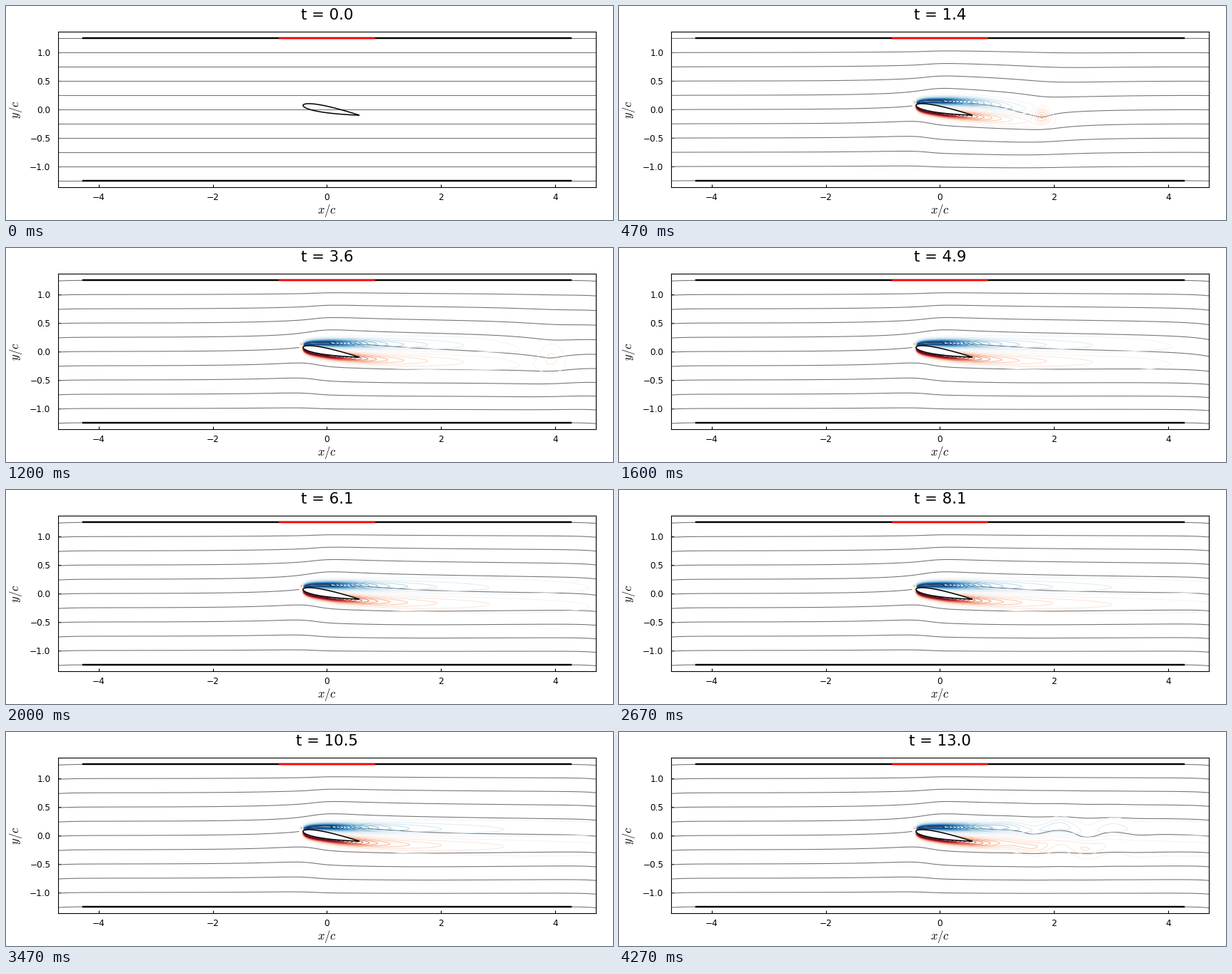
A matplotlib script that plays this animation: 850 by 300 pixels, repeating every 4.34 s.

```python
import numpy as np
import matplotlib.pyplot as plt
from matplotlib.animation import FuncAnimation

W, H, DPI = 850, 300, 100
TICKS, TICK_MS = 124, 35                       # 4340 ms per loop
STEP_MS, LEAD_MS, DT = 200 / 3, 25, 0.2026     # flow state advances 15 times a second
X0, Y0, SCALE = 449.4, 145.1, 79.85            # pixel origin, pixels per chord
LEFT, RIGHT, TOP, BOTTOM = 73, 826, 36, 254.3
WALL, GAP = 4.28, 2.5                          # wall half length, channel height
GAMMA, NU = 0.28, 0.0033
ALPHA = np.radians(10)

plt.rcParams.update({"font.family": "DejaVu Sans", "mathtext.fontset": "cm"})


def step(u):
    return 0.5 * (1 + np.tanh(u / 2))


def bell(u):
    return np.exp(-0.5 * u * u)


def airfoil():
    """NACA 0012 outline, pitched about its centroid."""
    s = 0.5 * (1 - np.cos(np.linspace(0, np.pi, 60)))
    half = 0.6 * (0.2969 * np.sqrt(s) - 0.126 * s - 0.3516 * s**2
                  + 0.2843 * s**3 - 0.1036 * s**4)
    px = np.r_[s[::-1], s[1:]] - 0.425
    py = np.r_[half[::-1], -half[1:]]
    c, n = np.cos(ALPHA), np.sin(ALPHA)
    return c * px + n * py, c * py - n * px


def front(t):
    """Position of the starting vortex."""
    return 0.43 + 0.96 * t


def wave(x, t):
    """Late wake instability: a growing, drifting wave packet."""
    late = t - 12.97
    env = np.exp(late / 0.8) * np.exp(-((x - 2.35 - 0.85 * late) / 1.0) ** 2)
    return env * np.cos(2 * np.pi * (x - 2.1 - 0.85 * late))


def channel_vortex(x, y, xv, yv, core):
    """Stream function of a unit vortex between the two walls."""
    k = np.pi / GAP
    soft = 0.5 * (k * core) ** 2
    c = np.cosh(k * (x - xv)) + soft
    return np.log((c - np.cos(k * (y - yv))) / (c + np.cos(k * (y + yv)))) / (4 * np.pi)


def stream(x, y, t):
    if t == 0:
        return y
    g = GAMMA * (1 - 0.5 * np.exp(-t / 0.5))
    xv = front(t)
    psi = y - g * channel_vortex(x, y, xv, -0.1, np.sqrt(2 * NU * t))
    for xb, yb, part in ((-0.3, 0.1, 0.55), (-0.05, 0.07, 0.35), (0.25, 0, 0.15)):
        psi = psi + g * part * channel_vortex(x, y, xb, yb, 0.13)

    # blockage of body and wake
    after = np.maximum(x, 0)
    mid = np.interp(x, [-0.6, 0.57, 1.5], [0.1, -0.08, -0.04])
    block = 0.114 * step((x + 0.2) / 0.13) / (1 + 0.05 * after**2) * step((xv - x) / 0.3)
    psi = psi - block * np.tanh((y - mid) / (0.13 + 0.02 * after)) * (1 - np.abs(y) / 1.25)

    # sag beyond the wall ends
    sag = np.where(x > 0, 0.02, 0.014) * (1 - np.exp(-(t / 3) ** 2))
    psi = psi + sag * np.exp(np.minimum(np.abs(x) - 4.71, 0) / 0.2)
    psi = psi - 0.045 * wave(x, t) * np.exp(-np.abs(y) / 0.22)

    chord = -np.tan(ALPHA) * x
    body = (np.abs(x - 0.02) < 0.5) & (np.abs(y - chord - 0.03) < 0.17)
    return np.ma.masked_where(body, psi)


def vorticity(x, y, t):
    xv, var = front(t), 2 * NU * t
    spot = np.exp(-((x - xv) ** 2 + (y + 0.1) ** 2) / (2 * var))
    start = GAMMA / (2 * np.pi * var) * spot

    xc = np.maximum(x, -0.46)
    dip = -0.13 * np.exp(-((x - xv) / 0.8) ** 2)
    wob = wave(x, t)
    upper = 0.15 - 0.018 * xc - 0.08 * np.exp(-(xc + 0.45) / 0.09) + dip + 0.055 * wob
    lower = (-0.19 + 0.13 * np.exp(-xc) + 0.09 * np.exp(-(xc + 0.45) / 0.06)
             + dip * 0.3 + 0.055 * wob)
    width = (0.045 + 0.022 * xc) * (1 - 0.6 * np.exp(-t / 0.4))
    amp = 5.3 / (np.hypot(np.maximum(x, 0), 0.4) - 0.05)
    amp = amp * step((0.43 + 0.7 * t - x) / (0.1 + 0.18 * t)) * step((x + 0.43) / 0.012)
    pulse = 0.35 * np.clip(wob, -1, 1)
    red = amp * (1 - pulse) * bell((y - lower) / width)
    blue = amp * (1 + pulse) * bell((y - upper) / width)
    nose = 4 * bell(np.hypot(x + 0.445, y - 0.13) / 0.012)
    return start + red - blue + nose


fig = plt.figure(figsize=(W / DPI, H / DPI), dpi=DPI, facecolor="white")
ax = fig.add_axes([LEFT / W, 1 - BOTTOM / H, (RIGHT - LEFT) / W, (BOTTOM - TOP) / H])
ax.set_xlim((LEFT - X0) / SCALE, (RIGHT - X0) / SCALE)
ax.set_ylim((Y0 - BOTTOM) / SCALE, (Y0 - TOP) / SCALE)
ax.set_xticks([-4, -2, 0, 2, 4])
ax.set_yticks([-1.0, -0.5, 0.0, 0.5, 1.0])
ax.tick_params(direction="in", length=3.2, width=0.8, labelsize=8.75)
ax.tick_params(axis="x", pad=5.4)
ax.tick_params(axis="y", pad=7.6)
for spine in ax.spines.values():
    spine.set_linewidth(0.8)


def label(px, py, text, size, **kw):
    return fig.text(px / W, 1 - py / H, text, size=size, ha="center", **kw)


title = label(449.6, 19, "", 15.3, va="baseline")
label(449.3, 287, "$x/c$", 12, va="center")
label(13.7, 145.5, "$y/c$", 12, va="center", rotation=90)

for side in (1.25, -1.25):
    ax.plot([-WALL, WALL], [side, side], color="black", lw=1.75, zorder=5)
ax.plot([-0.85, 0.85], [1.25, 1.25], color="red", lw=1.75, zorder=6,
        solid_capstyle="butt")
foil, = ax.fill(*airfoil(), facecolor="white", edgecolor="black", lw=1.1, zorder=4)

SX, SY = np.meshgrid(np.linspace(-4.73, 4.73, 380), np.linspace(-1.37, 1.37, 138))
VX, VY = np.meshgrid(-0.52 + 5.27 * np.linspace(0, 1, 280) ** 1.7,
                     np.linspace(-0.6, 0.42, 160))
LINES = np.arange(-5, 6) * 0.25
SHADES = np.arange(-14.5, 15)
drawn = []


def draw_flow(n):
    t = n * DT
    while drawn:
        drawn.pop().remove()
    title.set_text(f"t = {t:.1f}")
    foil.set_facecolor("white" if n else "none")
    drawn.append(ax.contour(SX, SY, stream(SX, SY, t), LINES, colors="#747474",
                            linewidths=0.78, linestyles="solid", zorder=2))
    if n:
        drawn.append(ax.contour(VX, VY, vorticity(VX, VY, t), SHADES, cmap="RdBu_r",
                                vmin=-13, vmax=13, linewidths=0.72, zorder=3))


shown = None


def update(tick):
    global shown
    n = int((tick * TICK_MS + LEAD_MS) / STEP_MS)
    if n != shown:
        draw_flow(n)
        shown = n
    return []


anim = FuncAnimation(fig, update, frames=TICKS, init_func=lambda: [],
                     interval=TICK_MS, repeat=True, repeat_delay=0, blit=False)
plt.show()
```
